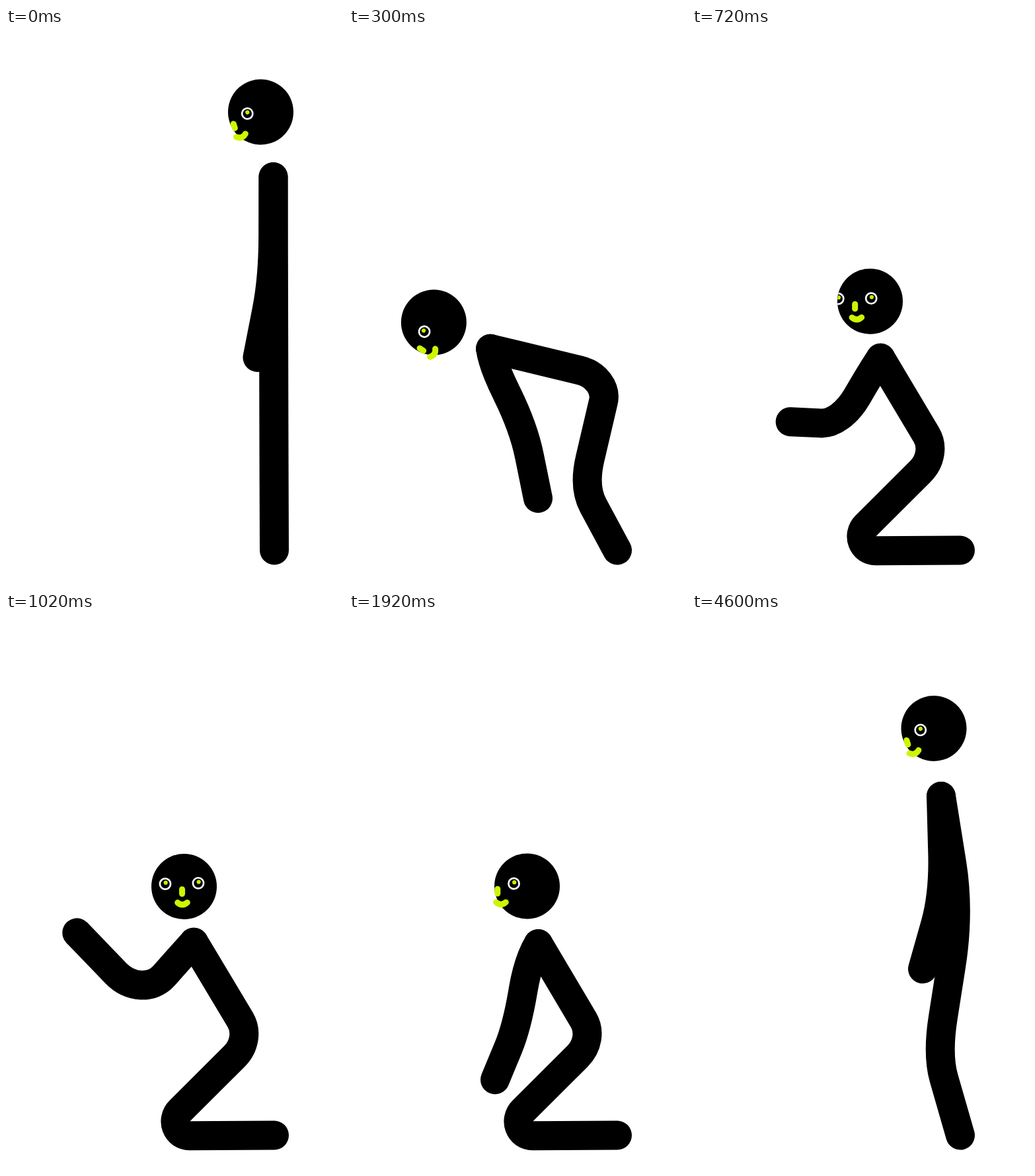
Recreate the animation shown at these times as an HTML page. Size 510 px wide and 842 px high, loop 4.63 s.

```html
<!DOCTYPE html>
<html lang="en">
<head>
<meta charset="utf-8">
<title>Kneeling figure</title>
<style>
  html, body { margin: 0; width: 100%; height: 100%; overflow: hidden; background: #fff; }
  svg { display: block; width: 100%; height: 100%; }
  .limb { fill: none; stroke: #000; stroke-width: 44; stroke-linecap: round; stroke-linejoin: round; }
  .mark { fill: none; stroke: #cff500; stroke-width: 9; stroke-linecap: round; stroke-linejoin: round; }
  .ring { fill: #000; stroke: #fff; stroke-width: 2.7; }
  .pupil { fill: #c8ec00; }
</style>
</head>
<body>
<svg viewBox="0 0 510 842" xmlns="http://www.w3.org/2000/svg">
  <defs>
    <clipPath id="skull"><circle r="49.5"/></clipPath>
    <g id="eye">
      <circle class="ring" r="8.1"/>
      <circle class="pupil" cx="0.7" cy="-1.8" r="3.1"/>
    </g>
  </defs>
  <path id="body" class="limb"/>
  <path id="arm" class="limb"/>
  <g id="head">
    <circle r="49.5"/>
    <g clip-path="url(#skull)">
      <use id="nearEye" href="#eye"/>
      <use id="farEye" href="#eye"/>
    </g>
    <path id="nose" class="mark" d="M0 4.3V11"/>
    <path id="mouth" class="mark" d="M-7.3 24.4Q0 30.6 7.3 24.2"/>
  </g>
</svg>
<script>
const LOOP = 4630, STEP = 30, REST = 1920, RISE = 4450;
const FOOT = [406, 789.5];
const $ = id => document.getElementById(id);

// head, neck, hip, knee, elbow, hand, hip rounding, shoulder shift, head tilt, face turn
const stand = [385.5, 127, 404.5, 225, 405, 413, 405.5, 645, 404, 378, 380.5, 498, .4, 0, -18, 0];
const bow = [93, 453, 196, 481, 399, 499, 387, 670, 269, 602, 310, 712, .26, -10, -70, 0];
const kneel = [269.5, 413, 286.5, 500, 372, 644, 225, 790.5, 245, 612, 190, 707, .2, -3, 0, .0435];
const arms = (pose, elbow, hand, shift, turn) =>
  [...pose.slice(0, 8), ...elbow, ...hand, pose[12], shift, 0, turn];
const reach = arms(kneel, [202, 583], [99, 461], 0, 1);
reach[1] = 413.5; reach[2] = 284; reach[3] = 497.5;
const low = arms(kneel, [248, 640], [212, 767], -6, 0);
const rest = arms(kneel, [254, 626], [221, 705.5], -11, 0);
const nod = rest.slice();
nod[14] = -14;
const rise = [366, 174.5, 377, 277, 405, 452, 371, 668, 381, 425, 349, 538, .42, 0, -18, 0];

const keys = [
  [0, stand], [270, bow], [420, kneel], [1080, reach], [1740, kneel],
  [1830, low], [REST, rest], [RISE, nod], [4600, rise], [LOOP, stand]
];

const mix = (a, b, k) => a + (b - a) * k;
const toward = (p, q, k) => [mix(p[0], q[0], k), mix(p[1], q[1], k)];
const heading = (p, q) => Math.atan2(q[1] - p[1], q[0] - p[0]);

// Motion advances in short steps and holds while the figure rests.
function snap(t) {
  if (t >= REST && t < RISE) return REST;
  const from = t < REST ? 0 : RISE;
  return from + Math.floor((t - from) / STEP) * STEP;
}

function poseAt(t) {
  let i = 0;
  while (i < keys.length - 2 && t >= keys[i + 1][0]) i++;
  const [t0, a] = keys[i], [t1, b] = keys[i + 1];
  const k = (t - t0) / (t1 - t0);
  return a.map((v, n) => mix(v, b[n], k));
}

// Rounds a joint with a nearly circular arc.
function corner(before, at, after, r0, r1) {
  const bend = heading(at, after) - heading(before, at);
  const turn = Math.atan2(Math.sin(bend), Math.cos(bend));
  const pull = 2 / 3 * (1 - Math.tan(turn / 4) ** 2);
  const a = toward(at, before, r0), b = toward(at, after, r1);
  return `L${a}C${toward(a, at, pull)} ${toward(b, at, pull)} ${b}`;
}

const shift = (id, x, y) => $(id).setAttribute('transform', `translate(${x} ${y})`);

function draw(time) {
  const p = poseAt(snap(time % LOOP));
  const point = n => [p[2 * n], p[2 * n + 1]];
  const [head, neck, hip, knee, elbow, hand] = [0, 1, 2, 3, 4, 5].map(point);
  const [round, offset, tilt, turn] = p.slice(12);

  $('body').setAttribute('d', `M${FOOT}` +
    corner(FOOT, knee, hip, .29, .26) +
    corner(knee, hip, neck, round * .9, round) + `L${neck}`);

  const shoulder = [neck[0] + offset, neck[1]];
  $('arm').setAttribute('d',
    `M${neck}Q${toward(elbow, shoulder, .8)} ${toward(elbow, shoulder, .45)}` +
    corner(shoulder, elbow, hand, .42, .4) + `L${hand}`);

  $('head').setAttribute('transform', `translate(${head}) rotate(${tilt})`);
  const eye = mix(-20, 25.4, turn);
  shift('nearEye', eye, mix(-4, -5.2, turn));
  shift('farEye', eye - 50, -4);
  shift('nose', mix(-44.7, 1, turn), 0);
  shift('mouth', mix(-39.5, 1, turn), 0);
}

const start = performance.now();
function tick() {
  draw(performance.now() - start);
  requestAnimationFrame(tick);
}
tick();
</script>
</body>
</html>
```
